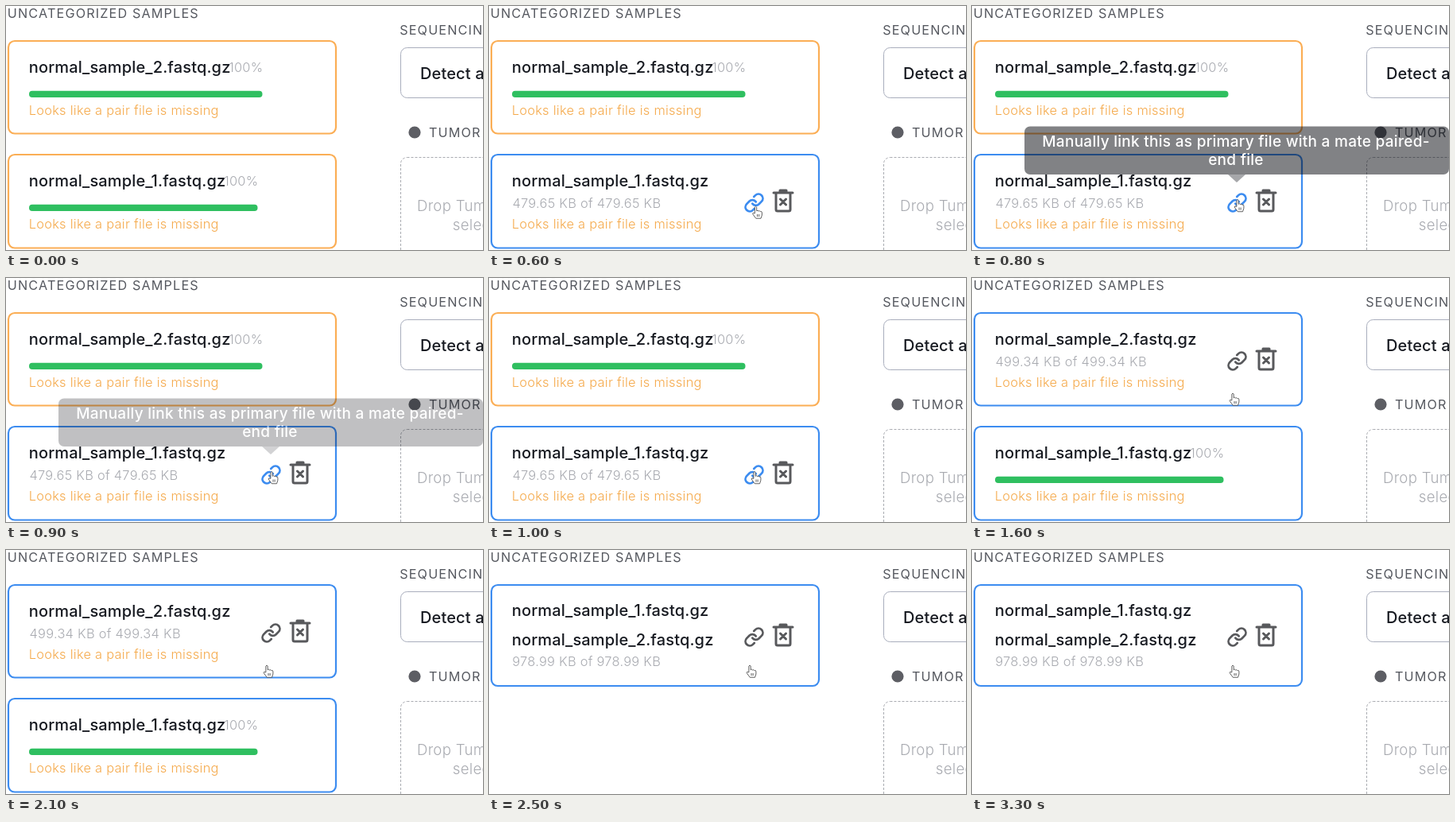
Write an HTML page that moves like this. It is 600x307 px and loops after 3.4 s.

```html
<!DOCTYPE html>
<html lang="en">
<head>
<meta charset="utf-8">
<title>Linking paired sample files</title>
<style>
  html, body { margin: 0; width: 100%; height: 100%; overflow: hidden; background: #fff; }
  svg { display: block; width: 600px; height: 307px; }
  text { font-family: Inter, sans-serif; white-space: pre; }
  .head { font-size: 16.2px; letter-spacing: 1.15px; fill: #55585f; }
  .name { font-size: 20px; font-weight: 500; letter-spacing: .14px; fill: #171a21; }
  .note { font-size: 16.4px; font-weight: 300; letter-spacing: .27px; fill: #a9abb1; }
  .warn { fill: #f5aa4c; }
  .drop { font-size: 18.6px; font-weight: 300; letter-spacing: .3px; fill: #a9abb1; }
  .tip { font-size: 19px; font-weight: 500; letter-spacing: .28px; fill: #fff; text-anchor: middle; }
  .icon { fill: none; stroke-linecap: round; stroke-linejoin: round; }
</style>
</head>
<body>
<svg viewBox="0 0 600 307">
  <text class="head" x="1.8" y="15">UNCATEGORIZED SAMPLES</text>
  <text class="head" x="495.2" y="36">SEQUENCING</text>
  <rect x="496.5" y="52.5" width="160" height="63" rx="8" fill="none" stroke="#a9aebd"/>
  <text class="name" x="521" y="92">Detect all</text>
  <circle cx="514" cy="159" r="7.6" fill="#5d5e64"/>
  <text class="head" x="532" y="164.5">TUMOR</text>
  <rect x="496.5" y="190.5" width="200" height="160" rx="8" fill="none" stroke="#a9abb1" stroke-dasharray="3 2"/>
  <text class="drop" x="517" y="258">Drop Tumor</text>
  <text class="drop" x="561.8" y="282">select</text>
  <g id="scene"></g>
</svg>
<script>
const LOOP = 3400, STEP = 100;
const ORANGE = '#fbae55', BLUE = '#3c8cf0', GRAY = '#58595c', GREEN = '#2fbf60';
const scene = document.getElementById('scene');

// Cursor stops after its entrance: time, x, y
const stops = [[600, 331, 251.5], [700, 330, 246], [800, 329.5, 243], [1000, 329.5, 243],
  [1100, 329, 227], [1200, 326, 177], [1300, 324, 152.5], [1400, 323.5, 144.5]];

function cursorAt(t) {
  if (t < 600) {
    const k = 1 - (1 - (t - 100) / 500) ** 2;
    return [566 - 235 * k, 292 - 40.5 * k];
  }
  const next = stops.findIndex(s => s[0] > t);
  if (next < 0) return stops.at(-1).slice(1);
  const [t0, x0, y0] = stops[next - 1], [t1, x1, y1] = stops[next];
  const k = (t - t0) / (t1 - t0);
  return [x0 + (x1 - x0) * k, y0 + (y1 - y0) * k];
}

const text = (cls, x, y, s) => `<text class="${cls}" x="${x}" y="${y}">${s}</text>`;
const fileName = n => `normal_sample_${n}.fastq.gz`;

const frame = (y, height, color) =>
  `<rect x="3" y="${y}" width="412" height="${height}" rx="8" fill="#fff" stroke="${color}" stroke-width="2.2"/>`;

const icons = (y, linkColor) => `
  <g class="icon" transform="translate(320.3 ${y - 10.7}) scale(1.1)" stroke="${linkColor}" stroke-width="2.5">
    <path d="M10 13a5 5 0 0 0 7.54.54l3-3a5 5 0 0 0-7.07-7.07l-1.72 1.71"/>
    <path d="M14 11a5 5 0 0 0-7.54-.54l-3 3a5 5 0 0 0 7.07 7.07l1.71-1.71"/>
  </g>
  <g class="icon" transform="translate(370 ${y})" stroke="${GRAY}" stroke-width="3">
    <path d="M-12-10H12M-9-10V11Q-9 13-7 13H7Q9 13 9 11V-10M-4-10V-13H4V-10M-3.5-2L3.5 5M3.5-2L-3.5 5"/>
  </g>`;

function card(y, height, n, size, { color, hover, linkColor = GRAY, end }) {
  const info = hover
    ? text('note', 29.5, y + 66.5, `${size} KB of ${size} KB`) + icons(y + 58, linkColor)
    : text('note', end - 42.3, y + 38.5, '100%') +
      `<rect x="29" y="${y + 62.8}" width="${end - 29}" height="8.2" rx="4" fill="${GREEN}"/>`;
  return frame(y, height, color) + text('name', 28.8, y + 39.5, fileName(n)) + info +
    text('note warn', 28.7, y + 93, 'Looks like a pair file is missing');
}

const mergedCard = () => frame(44, 127, BLUE) + text('name', 28.8, 83, fileName(1)) +
  text('name', 28.8, 120, fileName(2)) + text('note', 29.2, 146, '978.99 KB of 978.99 KB') + icons(107, GRAY);

const tooltip = opacity => `<g opacity="${opacity}">
  <rect x="66" y="151.5" width="534" height="60.5" rx="7" fill="#04070c" fill-opacity=".5"/>
  <path d="M322 212h22l-11 10z" fill="#a6a7aa"/>
  ${text('tip', 332, 176.5, 'Manually link this as primary file with a mate paired-')}
  ${text('tip', 332, 200, 'end file')}</g>`;

function cursor([x, y]) {
  const shape = x > 416
    ? 'M0 0V14L3.3 11L5.5 16L7.7 15L5.5 10.3H10Z'
    : 'M3.2 9V1.5Q4.3-.5 5.4 1.5V6Q7 4.7 7.8 6.3Q9.3 5.3 9.9 6.8Q11.7 6.2 11.8 8V11L10.5 15H4.5L.6 9.6Q.3 7.6 3.2 9ZM6.2 10V13M8.2 10V13';
  return `<path transform="translate(${x} ${y}) scale(1.05)" d="${shape}" fill="#fff" stroke="#444" stroke-width=".8" stroke-linejoin="round"/>`;
}

function draw(t) {
  let out = '';
  if (t < 2500) {
    const firstHover = t >= 1400, secondHover = t >= 300 && t < 1200;
    out += card(44, 116.5, 2, '499.34',
      { color: firstHover ? BLUE : ORANGE, hover: firstHover, end: t >= 1200 ? 323.5 : 322.5 });
    out += card(187, 117.5, 1, '479.65',
      { color: t >= 300 ? BLUE : ORANGE, hover: secondHover, linkColor: t >= 500 ? BLUE : GRAY, end: 316.5 });
  } else {
    out += mergedCard();
  }
  const tipOpacity = 1 - Math.abs(t - 800) / 200;
  if (tipOpacity > 0) out += tooltip(tipOpacity);
  if (t >= 100) out += cursor(cursorAt(t));
  scene.innerHTML = out;
}

let shown = -1;
const start = performance.now();
function tick() {
  const t = Math.floor((performance.now() - start) % LOOP / STEP) * STEP;
  if (t !== shown) draw(shown = t);
  requestAnimationFrame(tick);
}
tick();
</script>
</body>
</html>
```
